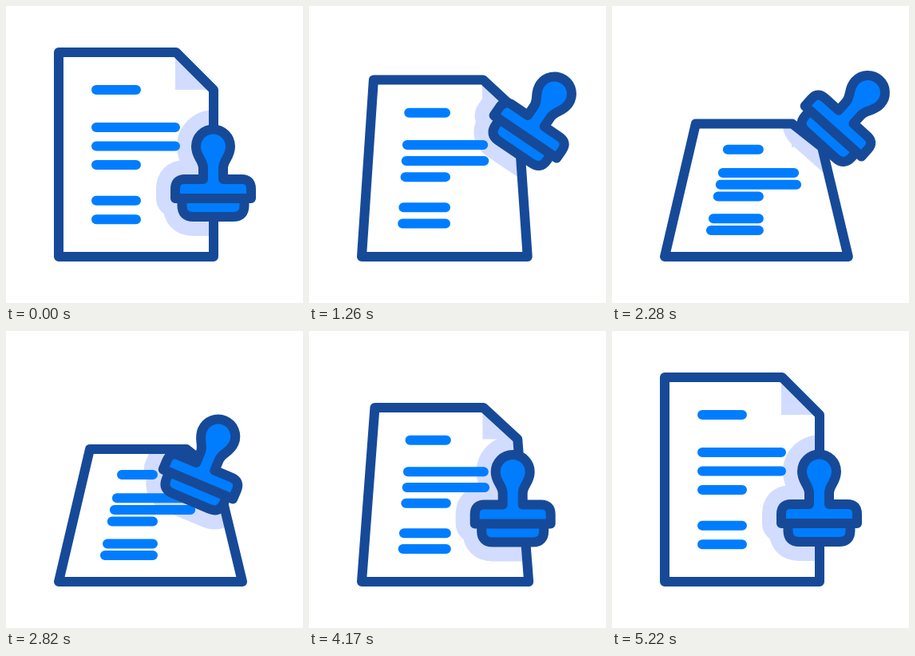
Recreate the animation shown at these times as an HTML page. Size 372 by 372 pixels, loop 5400 ms.

```html
<!DOCTYPE html>
<html lang="en">
<head>
<meta charset="utf-8">
<title>Document stamp</title>
<style>
  html, body { margin: 0; width: 100%; height: 100%; overflow: hidden; background: #fff; }
  svg { display: block; width: 100vw; height: 100vh; }
  .ink { stroke: #164a98; stroke-width: 12; stroke-linejoin: round; }
  .blue { fill: #007dff; }
  .tint { fill: #d2dcff; stroke: #d2dcff; stroke-linejoin: round; }
  .line { stroke: #007dff; stroke-width: 12; stroke-linecap: round; fill: none; }
  .spark { stroke: #ffc94f; stroke-width: 12; stroke-linecap: round; fill: none; }
</style>
</head>
<body>
<svg viewBox="0 0 372 372">
  <defs>
    <clipPath id="inside"><polygon id="clip"/></clipPath>
    <path id="handle" d="M-47.5 0V-12Q-47.5 -24 -35.5 -24H-12.5V-38C-12.5 -48 -21.5 -52 -21.5 -65A21.5 21.5 0 0 1 21.5 -65C21.5 -52 12.5 -48 12.5 -38V-24H35.5Q47.5 -24 47.5 -12V0Z"/>
    <path id="base" d="M-39 0V9Q-39 23 -25 23H25Q39 23 39 9V0"/>
  </defs>
  <g clip-path="url(#inside)">
    <polygon id="fold" fill="#d2dcff"/>
    <g id="shadow" class="tint" stroke-width="48">
      <use href="#handle"/><use href="#base"/>
    </g>
  </g>
  <path id="lines" class="line"/>
  <polygon id="sheet" class="ink" fill="none"/>
  <path id="sparks" class="spark"/>
  <g id="stamp" class="ink blue">
    <use href="#base"/><use href="#handle"/>
  </g>
</svg>
<script>
const LOOP = 5400, STEP = 30;
const $ = id => document.getElementById(id);
const mix = (a, b, k) => a + (b - a) * k;
const span = (t, from, to) => Math.min(1, Math.max(0, (t - from) / (to - from)));
const cubic = (a, b, t) => 3 * a * t * (1 - t) ** 2 + 3 * b * t * t * (1 - t) + t ** 3;

// Timing curve with the same handles as CSS cubic-bezier
const bezier = (x1, y1, x2, y2) => x => {
  let lo = 0, hi = 1;
  for (let i = 0; i < 30; i++) {
    const mid = (lo + hi) / 2;
    if (cubic(x1, x2, mid) < x) lo = mid;
    else hi = mid;
  }
  return cubic(y1, y2, lo);
};
const settle = bezier(0.19, 0, 0.52, 1);
const lift = bezier(0.19, 0, 0.24, 1);
const drop = bezier(0.51, 0, 1, 0.5);
const glide = bezier(0.27, 0, 0.12, 1);
const smooth = bezier(1 / 3, 0, 2 / 3, 1);

// Sheet corners: upright and tilted back
const UP = [[66, 58], [213, 58], [260, 105], [260, 314], [66, 314]];
const BACK = [[105, 148], [226, 148], [263, 177], [296, 314], [66, 314]];

// Where the stamp rests, hovers and lands
const REST = [259.5, 241], HIGH = [280.5, 154.5], LAND = [235.5, 268.5];
const LEAN = 45.5;

// Point on a curved path bent towards c
const arc = (a, c, b, k) => a.map((v, i) => mix(mix(v, c[i], k), mix(c[i], b[i], k), k));

function stampPose(t) {
  if (t < 1875) {
    const k = lift(span(t, 750, 1875));
    return [arc(REST, [258.5, 165], HIGH, k), LEAN * k];
  }
  if (t < 3000) {
    const k = drop(span(t, 1875, 3000));
    return [arc(HIGH, [204.5, 206], LAND, k ** 1.5), LEAN * (1 - k)];
  }
  return [arc(LAND, [246, 240], REST, glide(span(t, 3330, 5000))), 0];
}

function sheetTilt(t) {
  return t < 3000 ? settle(span(t, 750, 2370)) : 1 - settle(span(t, 3330, 5220));
}

// Text rows widen towards the viewer as the sheet leans back
function textRows(tilt) {
  return [0, 2, 3, 4, 5.9, 6.9].map(n => {
    const y = 105 + 23.5 * n, wide = 0.78 + 0.061 * n;
    const place = x => mix(x, 184 + (x - 163) * wide, tilt);
    const right = n === 2 || n === 3 ? 212 : 163;
    return `M${place(113)} ${mix(y, 180 + 14.65 * n, tilt)}H${place(right)}`;
  }).join("");
}

function sparkPath(t) {
  const head = smooth(span(t, 3060, 3360)), tail = smooth(span(t, 3240, 3720));
  if (head - tail < 0.01) return "";
  const ray = (x, y, X, Y) =>
    `M${mix(x, X, tail)} ${mix(y, Y, tail)}L${mix(x, X, head)} ${mix(y, Y, head)}`;
  return ray(299, 272, 316, 260) + ray(299, 286, 325, 286);
}

function draw(t) {
  const tilt = sheetTilt(t);
  const corners = UP.map((p, i) => p.map((v, j) => mix(v, BACK[i][j], tilt)));
  const [, top, cut] = corners;
  for (const id of ["sheet", "clip"]) $(id).setAttribute("points", corners.join(" "));
  $("fold").setAttribute("points", [[top[0] - 1, top[1]], [top[0] - 1, cut[1]], cut].join(" "));
  $("lines").setAttribute("d", textRows(tilt));
  $("sparks").setAttribute("d", sparkPath(t));

  const [spot, angle] = stampPose(t);
  for (const id of ["stamp", "shadow"])
    $(id).setAttribute("transform", `translate(${spot}) rotate(${angle})`);
}

const start = performance.now();
function tick() {
  const t = (performance.now() - start) % LOOP;
  draw(Math.floor(t / STEP) * STEP);
  requestAnimationFrame(tick);
}
tick();
</script>
</body>
</html>
```
